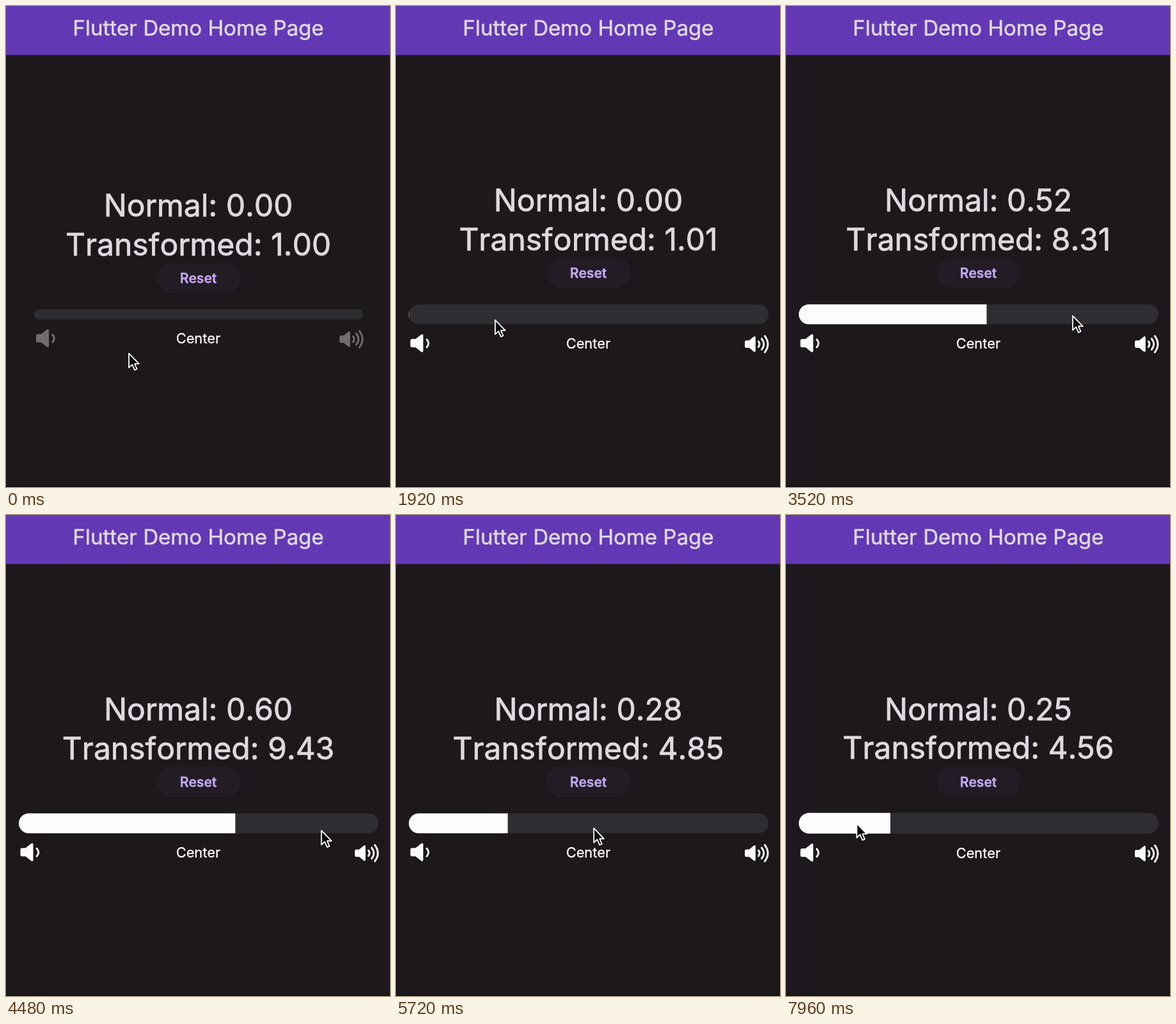
Animation, 600 px wide and 750 px high, one loop 8 s. Source, as an HTML page:

```html
<!DOCTYPE html>
<html lang="en">
<head>
<meta charset="utf-8">
<title>Slider demo</title>
<style>
  html, body { margin: 0; width: 100%; height: 100%; overflow: hidden; background: #1c181b; }
  svg { display: block; width: 100vw; height: 100vh; }
  text {
    font-family: Inter, "Open Sans", sans-serif; font-optical-sizing: none; font-kerning: none;
    text-anchor: middle; color: #dfd9e0; fill: currentColor; stroke: currentColor; stroke-width: 0.6;
  }
  .readout { font-size: 48px; stroke-width: 0.8; }
  .label { stroke-width: 0.3; }
  .wave { fill: none; stroke: #fffcff; stroke-width: 2.9; stroke-linecap: round; }
  .speaker { fill: #fffcff; }
</style>
</head>
<body>
<svg viewBox="0 0 600 750">
  <defs><clipPath id="barClip"><rect id="clipRect"/></clipPath></defs>
  <rect width="600" height="750" fill="#1c181b"/>
  <rect y="748" width="600" height="2" fill="#121012"/>
  <rect width="600" height="76.5" fill="#6238b5"/>
  <text x="300.5" y="46" font-size="33.1">Flutter Demo Home Page</text>

  <g id="upper">
    <text id="normal" class="readout" x="300.5" y="328"></text>
    <text id="transformed" class="readout" x="300.5" y="388.5"></text>
    <rect x="235" y="401.5" width="132" height="47.5" rx="23.7" fill="#171417"/>
    <rect x="235" y="400.3" width="132" height="47.5" rx="23.7" fill="#221d24"/>
    <text class="label" x="300.5" y="432" font-size="21" font-weight="600" style="color:#c5a9f6">Reset</text>
  </g>

  <g clip-path="url(#barClip)">
    <rect y="450" width="600" height="60" fill="#2f2d31"/>
    <rect id="fill" y="450" height="60" fill="#fffcff"/>
  </g>

  <g id="lower">
    <text class="label" x="300.5" y="526.3" font-size="21.8" style="color:#fffcff">Center</text>
    <g id="quiet">
      <path class="speaker" d="M47 514q0-2.5 2.5-2.5h5.5l8.5-6.7q3.5-2.3 3.5 1.5v23.4q0 3.8-3.5 1.5l-8.5-6.7h-5.5q-2.5 0-2.5-2.5z"/>
      <path class="wave" d="M72.6 512.3q5.4 6 0 12"/>
    </g>
    <g id="loud">
      <path class="speaker" d="M521 516q0-2.2 2.2-2.2h4.6l7-5.7q3-2 3 1.3v20.2q0 3.3-3 1.3l-7-5.7h-4.6q-2.2 0-2.2-2.2z"/>
      <path class="wave" d="M542.3 515.2q3.4 4.3 0 8.6M547.3 511q7 8.5 0 17M552.3 506.8q9.4 12.7 0 25.4"/>
    </g>
  </g>

  <path id="cursor" d="M-.5 .6V22.9L4.7 18.1L8.5 26.6L12.1 25L8.5 16.9H15.3Z" fill="#0c0a0c" stroke="#fff" stroke-width="1.8" stroke-linejoin="round"/>
</svg>
<script>
const LOOP = 8000, STEP = 40;
const PRESS = 776, RELEASE = 5950, PRESS_AGAIN = 7700;
const TRANSITION = 750, PERIOD = 0.8;
const DRAG_ORIGIN = 155, DRAG_WIDTH = 562;

// Pointer path: time, x, y
const path = [
  [0, 192.5, 541], [200, 192, 541], [740, 155, 489], [1880, 155, 489],
  [1920, 155.4, 489], [2560, 216, 488], [2680, 239.3, 487], [3520, 448.5, 482.5],
  [4230, 511, 483], [4700, 466, 497], [5160, 407.5, 487], [5900, 298, 488],
  [6520, 298, 488], [7050, 215, 516], [7600, 111, 481], [8000, 111, 480.5]
];

const $ = id => document.getElementById(id);
const setAttrs = (el, attrs) => Object.entries(attrs).forEach(([k, v]) => el.setAttribute(k, v));
const clamp = v => Math.max(0, Math.min(1, v));

function slope(i, axis) {
  const a = path[i - 1], b = path[i], c = path[i + 1];
  if (!a || !c || (b[axis] - a[axis]) * (c[axis] - b[axis]) <= 0) return 0;
  return (c[axis] - a[axis]) / (c[0] - a[0]);
}

// Hermite interpolation that rests at turning points
function pointer(t, axis) {
  const i = Math.max(1, path.findIndex(p => p[0] > t));
  const a = path[i - 1], b = path[i], span = b[0] - a[0];
  const u = (t - a[0]) / span, w = 1 - u;
  return a[axis] * (1 + 2 * u) * w * w + b[axis] * (3 - 2 * u) * u * u
    + span * u * w * (slope(i - 1, axis) * w - slope(i, axis) * u);
}

function elasticOut(ms) {
  const t = clamp(ms / TRANSITION);
  if (t === 0 || t === 1) return t;
  return 1 + 2 ** (-10 * t) * Math.sin((t - PERIOD / 4) * 2 * Math.PI / PERIOD);
}

function focusAt(t) {
  if (t >= PRESS_AGAIN) return elasticOut(t - PRESS_AGAIN);
  return t >= RELEASE ? 1 - elasticOut(t - RELEASE) : elasticOut(t - PRESS);
}

function render(t) {
  const focus = focusAt(t), spread = clamp(focus);
  const value = t < 1880 ? 0 : clamp((pointer(Math.min(t, RELEASE), 1) - DRAG_ORIGIN) / DRAG_WIDTH);
  const height = 15.5 * (1 + focus), shift = 7.75 * focus;
  const left = 44 - 24 * spread, width = 514 + 48 * spread;
  const opacity = 0.37 + 0.63 * spread;

  $('normal').textContent = 'Normal: ' + value.toFixed(2);
  $('transformed').textContent = 'Transformed: ' + (1 + 14 * value).toFixed(2);
  setAttrs($('upper'), { transform: `translate(0 ${-shift})` });
  setAttrs($('lower'), { transform: `translate(0 ${shift})` });
  setAttrs($('clipRect'), { x: left, y: 480.7 - height / 2, width, height, rx: height / 2 });
  setAttrs($('fill'), { x: left, width: width * value, opacity });
  setAttrs($('quiet'), { transform: `translate(${-24.5 * spread} 0)`, opacity });
  setAttrs($('loud'), { transform: `translate(${24 * spread} 0)`, opacity });
  setAttrs($('cursor'), { transform: `translate(${pointer(t, 1)} ${pointer(t, 2)})` });
}

// The picture advances at 25 frames per second
const start = performance.now();
function tick() {
  render(Math.round((performance.now() - start) / STEP) * STEP % LOOP);
  requestAnimationFrame(tick);
}
tick();
</script>
</body>
</html>
```
